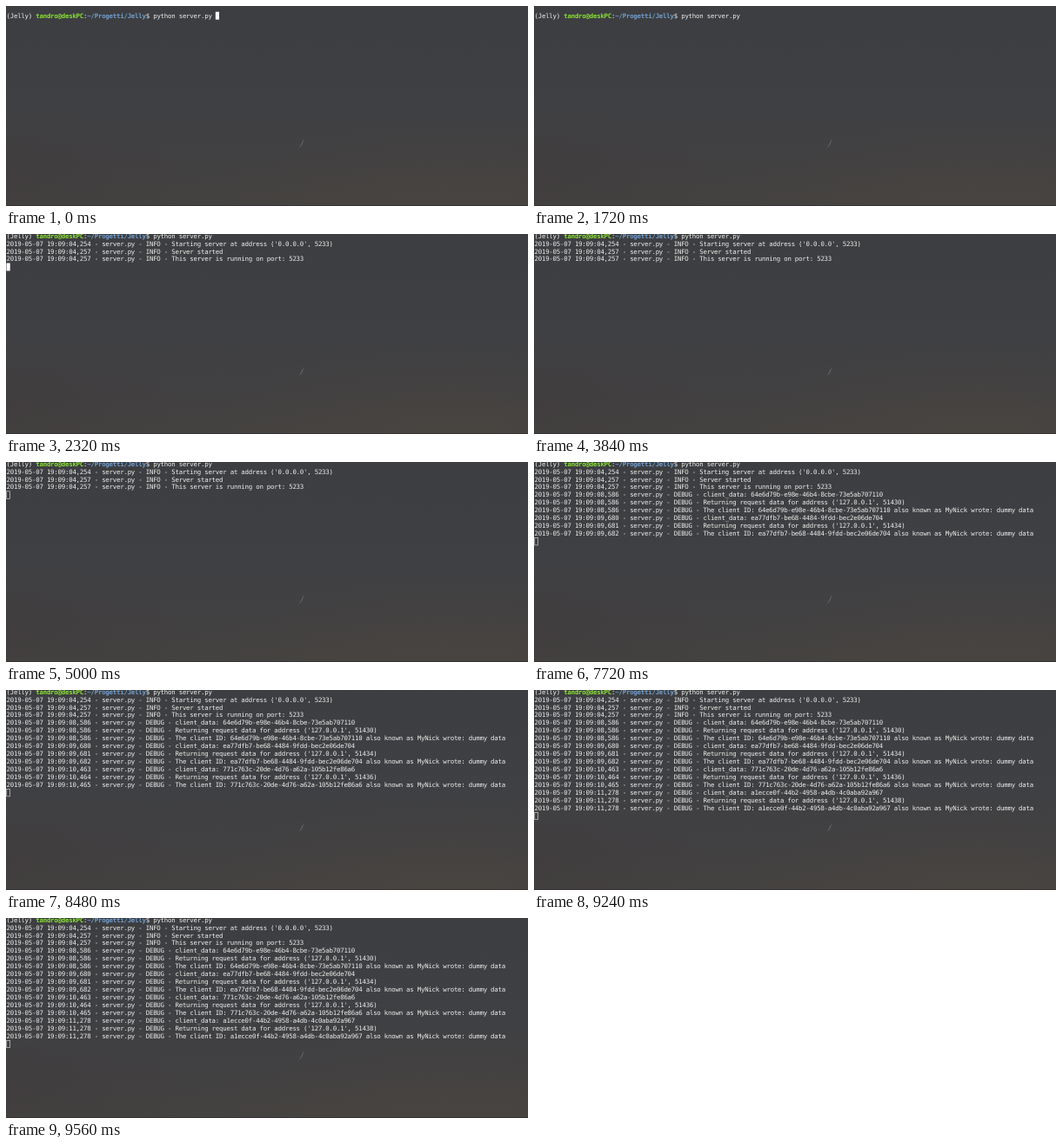
Recreate the animation shown at these times as an HTML page. Size 600 px wide and 231 px high, loop 10 s.

```html
<!DOCTYPE html>
<html lang="en">
<head>
<meta charset="utf-8">
<title>Server log</title>
<style>
  html, body { margin: 0; width: 100%; height: 100%; overflow: hidden; background: #3e3f42; }
  svg { display: block; width: 600px; height: 231px; }
  /* A 14px terminal font sits on a grid of 8px wide cells. */
  text {
    font: 14px "DejaVu Sans Mono", monospace;
    letter-spacing: calc(8px - .602em);
    fill: #eeeeec;
    white-space: pre;
    text-rendering: geometricPrecision;
  }
  .user { fill: #8ae234; font-weight: bold; }
  .path { fill: #729fcf; font-weight: bold; }
</style>
</head>
<body>
<svg viewBox="0 0 600 231">
  <defs>
    <linearGradient id="sky" x1="0" y1="0" x2="0" y2="1">
      <stop offset="0" stop-color="#3d3e41"/>
      <stop offset=".5" stop-color="#3f4043"/>
      <stop offset=".75" stop-color="#414042"/>
      <stop offset="1" stop-color="#444240"/>
    </linearGradient>
    <radialGradient id="glow" cx=".85" cy="1.05" r=".5">
      <stop offset="0" stop-color="#4a4540" stop-opacity=".65"/>
      <stop offset="1" stop-color="#4a4540" stop-opacity="0"/>
    </radialGradient>
    <radialGradient id="dusk" cx="0" cy=".85" r=".35">
      <stop offset="0" stop-color="#413d3e" stop-opacity=".8"/>
      <stop offset="1" stop-color="#413d3e" stop-opacity="0"/>
    </radialGradient>
  </defs>
  <rect width="600" height="231" fill="url(#sky)"/>
  <rect width="600" height="231" fill="url(#glow)"/>
  <rect width="600" height="231" fill="url(#dusk)"/>
  <rect y="230" width="600" height="1" fill="#3a3435"/>
  <path d="M341.500 153.500Q342.500 160 336.500 163.500Q340.500 159.500 341.500 153.500Z" fill="#747476" opacity=".8"/>
  <g transform="translate(.5 6.7) scale(.527)">
    <text id="prompt">(Jelly) <tspan class="user">tandro@deskPC</tspan>:<tspan class="path">~/Progetti/Jelly</tspan>$ python server.py</text>
    <g id="log"></g>
    <rect id="cursor"/>
  </g>
</svg>
<script>
const LOOP = 10000, CELL = 8, ROW = 17, ASCENT = 13, PROMPT_LENGTH = 57;
const $ = id => document.getElementById(id);

const entry = (time, level, message) => `2019-05-07 19:09:${time} - server.py - ${level} - ${message}`;

const request = (times, id, port) => [
  `client_data: ${id}`,
  `Returning request data for address ('127.0.0.1', ${port})`,
  `The client ID: ${id} also known as MyNick wrote: dummy data`
].map((message, i) => entry(times[i], 'DEBUG', message));

const lines = [
  entry('04,254', 'INFO', "Starting server at address ('0.0.0.0', 5233)"),
  entry('04,257', 'INFO', 'Server started'),
  entry('04,257', 'INFO', 'This server is running on port: 5233'),
  ...request(['08,586', '08,586', '08,586'], '64e6d79b-e98e-46b4-8cbe-73e5ab707110', 51430),
  ...request(['09,680', '09,681', '09,682'], 'ea77dfb7-be68-4484-9fdd-bec2e06de704', 51434),
  ...request(['10,463', '10,464', '10,465'], '771c763c-20de-4d76-a62a-105b12fe86a6', 51436),
  ...request(['11,278', '11,278', '11,278'], 'a1ecce0f-44b2-4958-a4db-4c0aba92a967', 51438)
].map((line, i) => {
  const text = document.createElementNS('http://www.w3.org/2000/svg', 'text');
  text.textContent = line;
  text.setAttribute('y', ASCENT + i * ROW);
  return $('log').appendChild(text);
});

// Start time, log lines shown (-1 = command not yet entered), cursor style
const steps = [
  [0, -1, 'solid'], [520, -1, 'off'], [1120, -1, 'solid'], [1720, -1, 'off'],
  [2040, 0, 'solid'], [2320, 3, 'solid'], [2640, 3, 'off'], [3280, 3, 'solid'],
  [3840, 3, 'off'], [4400, 3, 'solid'], [5000, 3, 'hollow'],
  [6600, 6, 'hollow'], [7720, 9, 'hollow'], [8480, 12, 'hollow'], [9240, 15, 'hollow']
];

const setAttributes = (node, values) => {
  for (const name in values) node.setAttribute(name, values[name]);
};

function show([, count, style]) {
  const waiting = count < 0, hollow = style === 'hollow';
  const inset = hollow ? .5 : 0;
  $('prompt').setAttribute('y', waiting ? ASCENT : ASCENT - ROW);
  lines.forEach((line, i) => line.setAttribute('visibility', i < count ? 'visible' : 'hidden'));
  setAttributes($('cursor'), {
    x: (waiting ? PROMPT_LENGTH * CELL : 0) + inset,
    y: Math.max(count, 0) * ROW + inset,
    width: CELL - 2 * inset,
    height: ROW - 2 * inset,
    fill: hollow ? 'none' : '#fff',
    stroke: hollow ? '#fff' : 'none',
    visibility: style === 'off' ? 'hidden' : 'visible'
  });
}

const start = performance.now();
let current;
function tick() {
  const time = (performance.now() - start) % LOOP;
  const step = steps.findLast(([at]) => at <= time);
  if (step !== current) show(current = step);
  requestAnimationFrame(tick);
}
tick();
</script>
</body>
</html>
```
